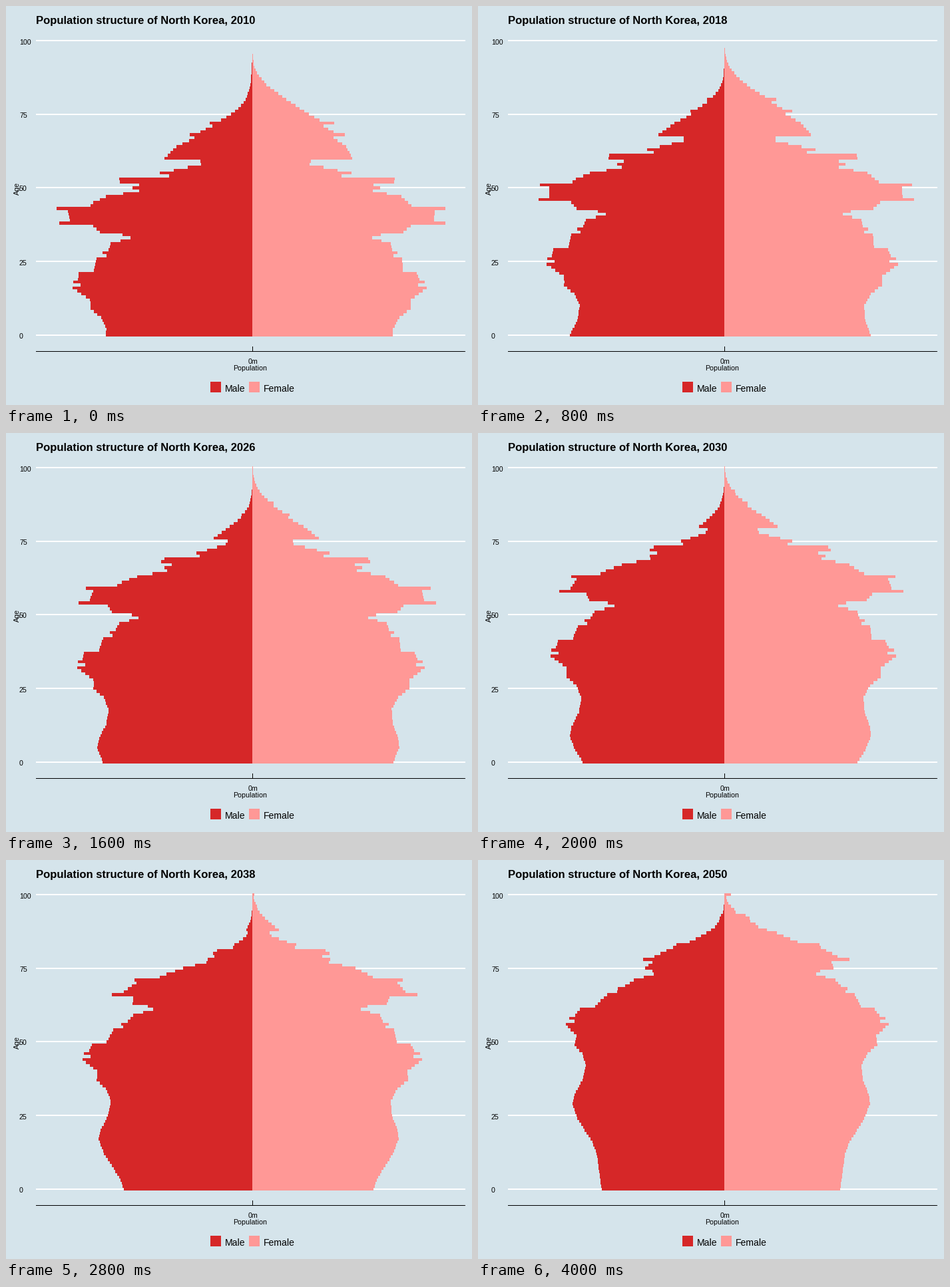
These frames come from a looping animation (700 by 600 pixels, 4.1 s). A matplotlib script:

```python
import numpy as np
import matplotlib.pyplot as plt
from matplotlib.animation import FuncAnimation
from matplotlib.patches import Polygon, Rectangle

plt.rcParams["font.family"] = "Liberation Sans"

W, H, DPI = 700, 600, 100
START, YEARS, OLDEST = 2010, 41, 100
ZERO_X, ZERO_Y, ROW = 370, 494.9, 4.43
BG, RED, PINK = "#d5e4eb", "#d62728", "#ff9896"

# Turning points by birth year: bar length in pixels for women,
# taken at the start or at birth, whichever is later
WOMEN = [
    (1915, 0.6), (1919, 3), (1921, 7), (1925, 21), (1930, 51), (1935, 85),
    (1937, 101), (1938, 123), (1939, 107), (1941, 122), (1942, 139),
    (1943, 122), (1946, 141), (1950, 150), (1951, 88), (1952, 86),
    (1955, 149), (1956, 134), (1957, 214), (1958, 213), (1959, 182),
    (1960, 192), (1961, 181), (1963, 224), (1966, 239), (1967, 290),
    (1968, 274), (1971, 273), (1972, 290), (1973, 238), (1975, 227),
    (1976, 193), (1977, 180), (1979, 208), (1981, 210), (1982, 218),
    (1983, 212), (1984, 225), (1988, 226), (1989, 247), (1991, 251),
    (1992, 259), (1993, 249), (1994, 262), (1998, 238), (2001, 238),
    (2004, 221), (2008, 211), (2013, 212), (2018, 220), (2021, 221),
    (2026, 212), (2034, 189), (2038, 182), (2050, 174),
]
MEN_PER_WOMAN = [
    (1915, 0.3), (1924, 0.12), (1930, 0.2), (1934, 0.33), (1940, 0.61),
    (1946, 0.81), (1950, 0.88), (1955, 0.93), (1961, 0.94), (1965, 1.02),
    (1972, 1), (1980, 1.025), (1989, 1.055), (1994, 1.03), (2000, 1.02),
    (2010, 1.043), (2022, 1.06),
]
PROGRESS = 0.018  # yearly fall of the log death rate


def curve(points, x):
    return np.interp(x, *zip(*points))


def women(born):
    return np.where(born < 1915, 0, curve(WOMEN, born))


def men(born):
    return women(born) * curve(MEN_PER_WOMAN, born)


def project(cohort, floor, slope, pivot):
    """Age the cohorts with Gompertz mortality; the last row is 100 and over."""
    ages = np.arange(OLDEST + 1)
    rate = floor + np.exp(slope * (ages + 0.5 - pivot))
    pop = cohort(START - ages)
    history = [pop]
    for year in range(START + 1, START + YEARS):
        alive = pop * np.exp(-rate * np.exp(-PROGRESS * (year - 0.5 - 2030)))
        pop = np.append(cohort(year), alive[:-1])
        pop[-1] += alive[-1]
        history.append(pop)
    return history


males = project(men, 0.0007, 0.099, 101.1)
females = project(women, 0.0003, 0.1, 107.7)

fig = plt.figure(figsize=(W / DPI, H / DPI), dpi=DPI, facecolor=BG)
ax = fig.add_axes([0, 0, 1, 1])
ax.set_xlim(0, W)
ax.set_ylim(H, 0)
ax.axis("off")


def box(x, y, w, h, color):
    ax.add_patch(Rectangle((x, y), w, h, fc=color, lw=0, aa=False, zorder=1))


def label(x, y, text, px, **kw):
    return ax.text(x, y, text, fontsize=px * 72 / DPI, va="baseline", **kw)


edges = np.round(ZERO_Y + ROW / 2 - ROW * np.arange(OLDEST + 2))
outline_y = np.repeat(edges, 2)


def outline(lengths, side):
    steps = np.repeat(np.round(lengths), 2)
    x = ZERO_X + side * np.concatenate([[0], steps, [0]])
    return np.column_stack([x, outline_y])


def half(lengths, side, color):
    shape = Polygon(outline(lengths, side), fc=color, lw=0, aa=False, zorder=2)
    return ax.add_patch(shape)


for age in range(0, OLDEST + 1, 25):
    y = round(ZERO_Y - ROW * age)
    box(45, y - 1, 645, 2, "white")
    label(20, y + 5.5, str(age), 10.6)

box(45, 519, 645, 1, "black")
box(370, 512, 1, 7, "black")
label(370.5, 538, "0m", 10.6, ha="center")
label(366.5, 548, "Population", 10.6, ha="center")
label(20, 274, "Age", 10.6, ha="center", rotation=90, rotation_mode="anchor")

for x, name, color in [(307, "Male", RED), (365, "Female", PINK)]:
    box(x, 565, 16, 16, color)
    label(x + 21.5, 580, name, 14)

title = label(45, 27, "", 16.6, weight="bold")
left = half(males[0], -1, RED)
right = half(females[0], 1, PINK)


def draw(i):
    title.set_text(f"Population structure of North Korea, {START + i}")
    left.set_xy(outline(males[i], -1))
    right.set_xy(outline(females[i], 1))
    return title, left, right


anim = FuncAnimation(fig, draw, frames=YEARS, interval=100, repeat=True)
plt.show()
```
